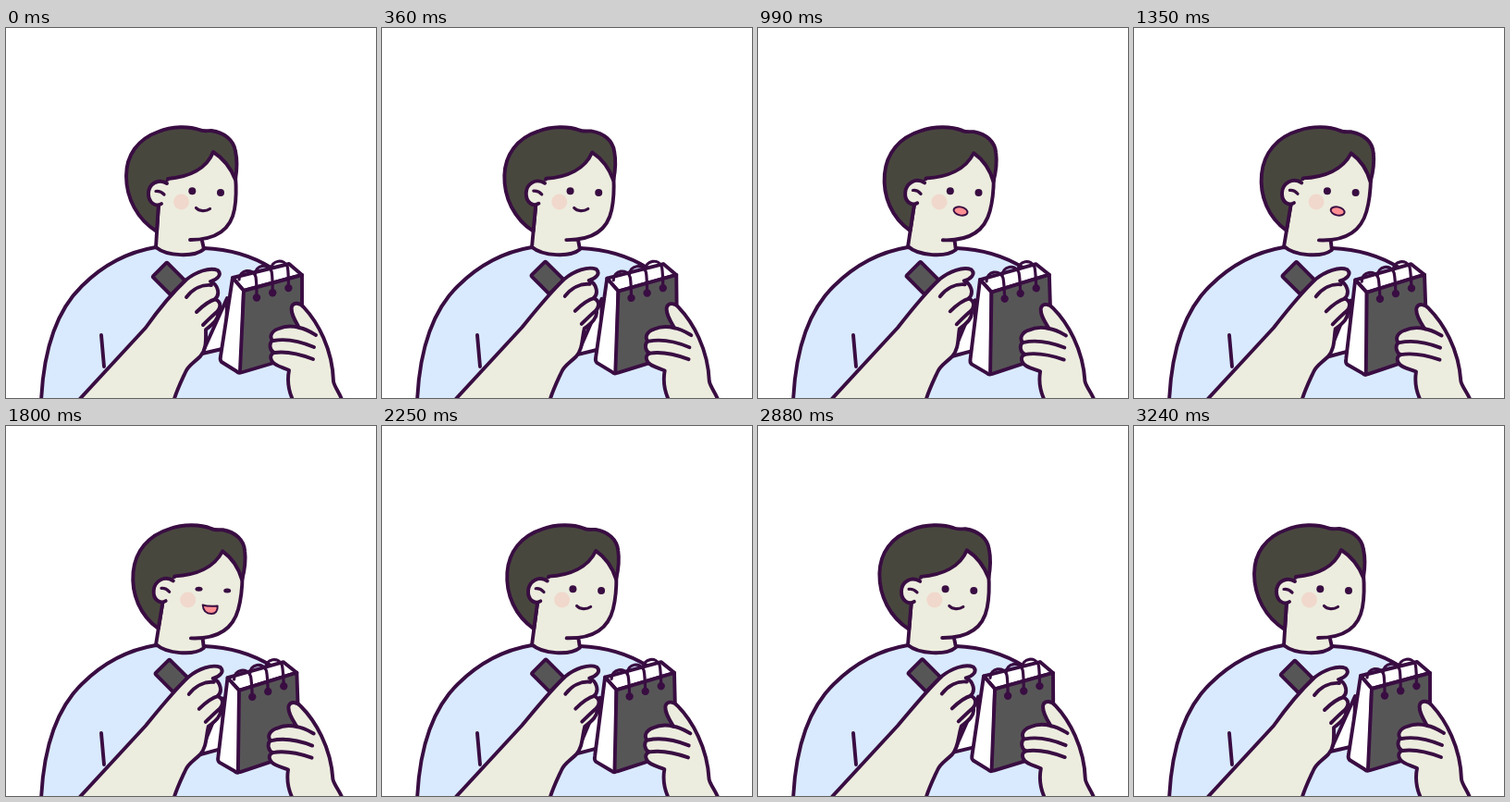
An HTML page for the animation above (4050 ms loop, 400 by 400 pixels).

```html
<!DOCTYPE html>
<html lang="en">
<head>
<meta charset="utf-8">
<title>Desk calendar</title>
<style>
  html, body { margin: 0; width: 100%; height: 100%; overflow: hidden; background: #fff; }
  svg { display: block; width: 100vw; height: 100vh; }
  .line { fill: none; stroke: #390d42; stroke-width: 3.9; stroke-linecap: round; stroke-linejoin: round; }
  .skin { fill: #ecedde; }
  .hair { fill: #48473e; }
  .shirt { fill: #d9eaff; }
  .grey { fill: #575657; }
  .white { fill: #fff; }
  .ink { fill: #390d42; stroke: none; }
  .flat { stroke: none; }
  .thin { stroke-width: 3.2; }
  .tongue { fill: #ff8f93; stroke-width: 2; }
</style>
</head>
<body>
<svg viewBox="0 0 400 400" class="line">
  <path class="shirt" d="M38 404C40 358 50 310 82 279C105 256 132 242 162 237L214 238C240 239 266 246 288 260L300 268L316 404Z"/>
  <path d="M103 332L106 366"/>

  <g id="head">
    <path class="skin flat" d="M165 188L162 237C174 247 204 248 214 239L212 229C235 228 248 214 248 190V160L224 133L172 160Z"/>
    <path d="M248 160C249 172 249 185 247 196C243 219 226 229 199 229M212 230L214 239C204 248 174 247 162 237L165 190"/>
    <path class="hair" d="M175 163C198 161 217 152 224 134C235 141 243 151 248 164C250 152 250 142 248 133C246 121 236 113 222 111C217 111 213 112 209 110C198 106 179 106 165 112C142 120 130 138 130 160C130 184 142 207 163 220L165 190L168 170L174 169Z"/>
    <path class="skin flat" d="M166 168L178 165V191H166Z"/>
    <path class="skin" d="M174 168C164 162 154 169 154 179C154 189 162 194 168 190"/>
    <path class="thin" d="M162 176.5C166 176 169 178 171 180"/>
  </g>

  <g id="face">
    <circle class="flat" fill="#f1d8cc" cx="189.5" cy="188" r="8.5"/>
    <ellipse class="ink eye" cx="201.3" cy="176.3" rx="4"/>
    <ellipse class="ink eye" cx="232" cy="178" rx="4"/>
    <path class="mouth thin" d="M205.5 194.5C209 198.5 216 198.5 220.5 195.5"/>
    <path class="mouth tongue" d="M205.5 193.5C210 195 216 195 221.5 194.5C222 200 219 203 215 203C210 203 206 200 205.5 193.5Z"/>
    <ellipse class="mouth tongue" cx="212.5" cy="198" rx="7.6" ry="4.5" transform="rotate(13 212.5 198)"/>
  </g>

  <g id="calendar">
    <path class="white" d="M239 292L212 352L238 346Z"/>
    <path class="white" d="M245 270L306 255L320 267L257 284Z"/>
    <path class="white" d="M245 270L257 284L254 372Q252 374 249 371L233 361Q231 359 232 355Z"/>
    <path class="grey" d="M257 284L320 267V353L256 372Q253 373 253 370Z"/>
    <g id="rings"></g>
  </g>

  <g id="right">
    <path class="skin" d="M311 404C304 390 304 380 306 370C300 367 289 365 287 359C285 355 287 352 290 351C285 349 284 341 288 338C284 333 288 327 295 325C302 322 310 322 317 324C313 317 307 308 309 301C311 296 318 297 322 302C337 318 353 347 354 382C355 388 361 395 364 404"/>
    <path d="M317 324C324 325 330 329 335 332M289 338C305 335 319 339 333 345M290 351C304 349 319 353 332 358"/>
  </g>

  <rect id="block" class="grey" x="-14" y="-11" width="28" height="22" rx="1.5"/>
  <path id="arm" class="skin"/>
  <path id="fingers" d="M222 278C212 277 202 282 195 291M227 293C219 295 212 301 206 307M229 306C223 311 218 316 213 321"/>
</svg>
<script>
const LOOP = 4050, MOVE = 3240, STEP = 90, TURN = 2 * Math.PI;
const { sin, cos, floor, abs, max, min, PI } = Math;
const $ = id => document.getElementById(id);
const all = s => [...document.querySelectorAll(s)];
const set = (el, name, value) => el.setAttribute(name, value);

const eyes = all('.eye'), mouths = all('.mouth');

$('rings').innerHTML = [0, 1, 2].map(i => `<g transform="translate(${i * 17.2} ${i * -5.2})">
  <path class="thin" d="M252 272C252 261 267 259 270 269C271 275 271 283 271 291"/>
  <circle class="ink" cx="271" cy="291.5" r="4.2"/></g>`).join('');

// Quick lean in, slower return
const lean = u => 1.04 * max(0, sin(PI * u ** .88)) ** 1.5;

// Writing strokes: two waves over a slow drift
const stroke = u => 1.3 * (1 - cos(2 * TURN * u)) + 1.45 * (1 - cos(3 * TURN * u)) - .8 * sin(TURN * u);

const blink = t => max(0, ...[630, 1890].map(c => 1 - abs(t - c) / 180));

// Smile, or the two talking shapes in turn
const mouth = t => t < 540 || t >= 2160 ? 0 : 1 + floor((t - 540) / 270) % 2;

// The hand shifts while the elbow and wrist stay in place
function armPath(dx, dy) {
  const p = (x, y) => `${x + dx} ${y + dy} `;
  return `M78 403L151 324C${p(163, 307)}${p(179, 287)}${p(195, 272)}` +
    `C${p(205, 264)}${p(220, 258)}${p(229, 262)}C${p(234, 267)}${p(228, 272)}${p(221, 274)}` +
    `C${p(229, 277)}${p(232, 288)}${p(226, 293)}C${p(233, 296)}${p(232, 302)}${p(229, 306)}` +
    `C${p(231, 314)}${p(224, 320)}${p(216, 326)}` +
    `C216 337 217 347 210 355C203 362 197 365 194 372C188 385 184 393 181 404`;
}

function draw(ms) {
  const t = floor(ms % LOOP / STEP) * STEP, u = min(1, t / MOVE);
  const p = lean(u), dx = stroke(u), dy = -.4 * dx;
  const k = .1 * p, m = .04 * p;
  set($('head'), 'transform', `matrix(1 ${m} ${-k} 1 ${238 * k} ${-190 * m})`);
  set($('face'), 'transform', `translate(${7.4 * p} 0)`);
  set($('calendar'), 'transform', `translate(${-3.6 * p} 0) rotate(${-2 * p} 310 330)`);
  set($('right'), 'transform', `translate(${-.5 * p} 0) rotate(${-2 * p} 350 385)`);
  set($('block'), 'transform', `translate(${176 + dx} ${271 + dy}) rotate(45)`);
  set($('fingers'), 'transform', `translate(${dx} ${dy})`);
  set($('arm'), 'd', armPath(dx, dy));
  eyes.forEach(e => set(e, 'ry', 4 - 3 * blink(t)));
  mouths.forEach((e, i) => set(e, 'visibility', i === mouth(t) ? 'visible' : 'hidden'));
}

const start = performance.now();
function tick() {
  draw(performance.now() - start);
  requestAnimationFrame(tick);
}
tick();
</script>
</body>
</html>
```
